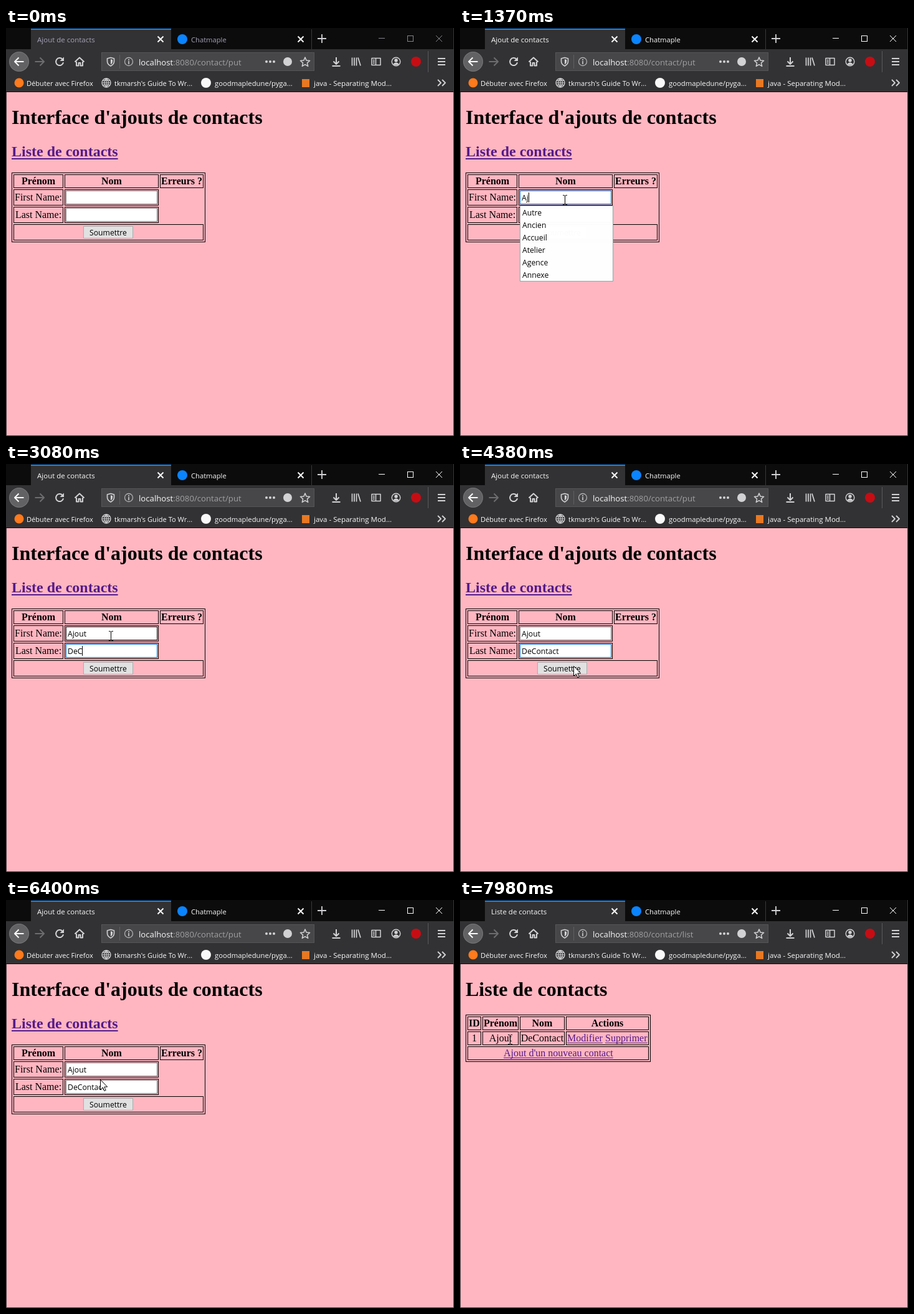
Animation, 719 px wide and 655 px high, one loop 8 s. Source, as an HTML page with a canvas:

```html
<!DOCTYPE html>
<html lang="fr">
<head>
<meta charset="utf-8">
<title>Ajout de contacts</title>
<style>
html, body { margin: 0; width: 100%; height: 100%; overflow: hidden; background: #ffb6c1; }
canvas { display: block; }
</style>
</head>
<body>
<canvas id="stage" width="719" height="655"></canvas>
<script>
const g = document.getElementById('stage').getContext('2d');
const LOOP = 8000;
const UI = '"Open Sans", "Noto Sans", sans-serif';
const SERIF = '"Liberation Serif", "Times New Roman", serif';
const FIELD = '12.2px ' + UI;
const BODY = '16px ' + SERIF;
const BOLD = 'bold 16px ' + SERIF;
const PINK = '#ffb6c1', BAR = '#323234', DARK = '#0c0c0d', LIGHT = '#f9f9fa', ICON = '#d2d2d4';
const VISITED = '#551a8b', BLUE = '#0a84ff';

// Times of the main events, in ms
const ACTIVATE = 520, FOCUS_FIRST = 600, FOCUS_LAST = 2030, SUBMIT = 5580, RELOADED = 5735;
const STATUS = 6930, FOLLOW = 7110, LIST = 7300, LISTED = 7330;

const first = { word: 'Ajout', keys: [990, 1370, 1570, 1640, 1780], y: 261 };
const last = { word: 'DeContact', keys: [2390, 2720, 2980, 3100, 3240, 3380, 3560, 3770, 3950], y: 289 };

const path = [
  [70, 600, 690], [100, 545, 640], [150, 460, 567], [200, 360, 475], [250, 285, 408],
  [320, 215, 335], [420, 172, 285], [480, 168, 276], [4150, 168, 276], [4250, 172, 292],
  [4330, 180, 312], [4380, 182, 324], [4460, 178, 348], [4610, 178, 348], [4660, 176, 340],
  [4760, 175, 330], [5020, 175, 330], [5170, 173, 332], [6200, 173, 332], [6370, 158, 300],
  [6450, 140, 270], [6560, 118, 228], [6730, 109, 200], [7850, 109, 200], [7960, 80, 224]
];

const clamp = v => Math.max(0, Math.min(1, v));

function fill(x, y, w, h, color) {
  g.fillStyle = color;
  g.fillRect(x, y, w, h);
}

function frame(x, y, w, h, color) {
  g.strokeStyle = color;
  g.lineWidth = 1;
  g.strokeRect(x + .5, y + .5, w - 1, h - 1);
}

function disc(x, y, r, color) {
  g.fillStyle = color;
  g.beginPath();
  g.arc(x, y, r, 0, 7);
  g.fill();
}

function ring(x, y, r, color, width) {
  g.strokeStyle = color;
  g.lineWidth = width;
  g.beginPath();
  g.arc(x, y, r, 0, 7);
  g.stroke();
}

function text(str, x, y, font, color, align = 'left') {
  g.font = font;
  g.fillStyle = color;
  g.textAlign = align;
  g.fillText(str, x, y);
  return g.measureText(str).width;
}

function ui(str, x, y, size, color) {
  return text(str, x, y, size + 'px ' + UI, color);
}

function icon(d, x, y, color = ICON, width = 2, solid) {
  const p = new Path2D(d);
  g.save();
  g.translate(x, y);
  if (solid) {
    g.fillStyle = solid;
    g.fill(p);
  }
  if (width) {
    g.strokeStyle = color;
    g.lineWidth = width;
    g.lineJoin = 'round';
    g.stroke(p);
  }
  g.restore();
}

function star(x, y, r) {
  let d = '';
  for (let i = 0; i < 10; i++) {
    const a = i * Math.PI / 5, k = i % 2 ? r * .45 : r;
    d += (i ? 'L' : 'M') + Math.sin(a) * k + ' ' + -Math.cos(a) * k;
  }
  icon(d + 'Z', x, y, ICON, 1.5);
}

// Blue wave over the tab once a page has loaded
function burst(t, start) {
  const p = (t - start) / 375;
  if (p < 0 || p >= 1) return;
  const e = 1 - (1 - p) ** 1.7;
  g.save();
  g.beginPath();
  g.rect(40, 3, 225, 31);
  g.clip();
  g.globalAlpha = .45 * (1 - e);
  disc(59, 18, 5 + 95 * e, BLUE);
  g.restore();
}

function tabs(t) {
  const active = t >= ACTIVATE;
  const label = active ? LIGHT : '#a5a1b6';
  const control = active ? '#fff' : '#85858a';
  const cross = 'M-4.5 -4.5L4.5 4.5M4.5 -4.5L-4.5 4.5';
  fill(0, 0, 719, 34, DARK);
  fill(40, 1, 225, 33, BAR);
  fill(40, 1, 225, 2, BLUE);
  fill(490, 2, 1, 32, '#39393b');
  burst(t, RELOADED);
  burst(t, LISTED);
  ui(t < LIST ? 'Ajout de contacts' : 'Liste de contacts', 50, 23, 11.5, label);
  disc(283, 18, 8, BLUE);
  ui('Chatmaple', 297, 23, 11.2, label);
  icon(cross, 248, 18, LIGHT, 2);
  icon(cross, 473, 18, LIGHT, 2);
  icon('M-7 0H7M0 -7V7', 507, 17, ICON, 1.8);
  fill(598, 16, 10, 1, control);
  frame(644, 12, 10, 10, control);
  icon('M-5 -5L5 5M5 -5L-5 5', 695, 17, control, 1);
}

function toolbar(t) {
  fill(0, 34, 719, 69, BAR);
  disc(21, 54, 16, '#626264');
  ring(21, 54, 15.5, '#757577', 1);
  icon('M7.5 0H-7M-.5 -6.5L-7 0L-.5 6.5', 21, 54, LIGHT);
  icon('M-7.5 0H7M.5 -6.5L7 0L.5 6.5', 54, 54, '#6d6d6f');
  icon('M4.6 -3.9A6 6 0 1 0 6 1.2', 86, 54);
  icon('M7 -7.5V-1H.5Z', 86, 54, ICON, 0, ICON);
  icon('M-7.5 .5L0 -6.5L7.5 .5M-5 0V6.5H-1.5V2H1.5V6.5H5V0', 118, 54);

  fill(153, 39, 342, 30, '#474749');
  frame(153, 39, 342, 30, '#555557');
  icon('M0 -6.5L5.5 -5V-.5C5.5 3 3 5.5 0 7C-3 5.5 -5.5 3 -5.5 -.5V-5Z', 168, 54, ICON, 1.6);
  icon('M0 -4L3 -3V0C3 2 1.5 3.5 0 4.5Z', 168, 54, ICON, 0, ICON);
  fill(182, 43, 1, 22, '#606062');
  ring(197, 54, 6.5, '#b1b1b3', 1.3);
  fill(196, 53, 2, 5, '#b1b1b3');
  fill(196, 50, 2, 2, '#b1b1b3');
  const w = ui('localhost', 213, 60, 13.2, LIGHT);
  ui(':8080/contact/' + (t < LIST ? 'put' : 'list'), 213 + w, 60, 13.2, '#a0a0a2');
  for (let i = -1; i < 2; i++) disc(424 + i * 6, 54, 2, ICON);
  disc(452, 54, 7, ICON);
  star(480, 55, 8);

  icon('M0 -7V4M-4.5 -.5L0 4L4.5 -.5M-6.5 7H6.5', 530, 54);
  icon('M-6.5 -6.5V6.5M-3 -6.5V6.5M.5 -6.5V6.5M3 -6.5L7 6.5', 562, 54, ICON, 1.7);
  icon('M-7 -5.5H7V5.5H-7ZM-.5 -5.5V5.5M-5 -2.5H-2.5M-5 0H-2.5M-5 2.5H-2.5', 594, 54, ICON, 1.5);
  ring(626, 54, 6.8, ICON, 1.4);
  disc(626, 52, 2.7, ICON);
  icon('M-4.5 4C-3 .5 3 .5 4.5 4C2.5 6 -2.5 6 -4.5 4Z', 626, 54, ICON, 0, ICON);
  disc(658, 54, 8, '#c70d14');
  fill(677, 37, 1, 34, '#5a5a5c');
  icon('M-6 -5H6M0 0M-6 0H6M-6 5H6', 699, 54);

  disc(21, 88, 7.5, '#ff7a1c');
  ui('Débuter avec Firefox', 33, 93, 11.1, LIGHT);
  ring(161, 88, 7, ICON, 1.3);
  icon('M-7 0H7M0 -7V7M-6 -3.5H6M-6 3.5H6M0 -7C-4.5 -3 -4.5 3 0 7C4.5 3 4.5 -3 0 -7', 161, 88, ICON, 1.1);
  ui("tkmarsh's Guide To Wr...", 174, 93, 11.1, LIGHT);
  disc(321, 88, 8, LIGHT);
  ui('goodmapledune/pyga...', 335, 93, 11.3, LIGHT);
  fill(475, 82, 12, 13, '#e87922');
  ui('java - Separating Mod...', 494, 93, 11.5, LIGHT);
  icon('M-6 -5L-1 0L-6 5M1 -5L6 0L1 5', 699, 88, ICON, 1.8);
  fill(0, 102, 719, 1, DARK);
}

function input(t, field, focused, hovered) {
  const y = field.y;
  fill(96, y, 147, 22, '#fff');
  frame(96, y, 147, 22, focused ? '#0078d7' : hovered ? '#171717' : '#7a7a7a');
  const n = field.keys.filter(k => k <= t).length;
  const w = text(field.word.slice(0, n), 99, y + 16, FIELD, '#000');
  if (!focused) return;
  const start = n ? field.keys[n - 1] : field === first ? FOCUS_FIRST : FOCUS_LAST;
  if ((t - start) % 800 < 400) fill(Math.round(99 + w), y + 3, 1, 16, '#000');
}

function popup(t, y, rows, from, to) {
  const a = Math.min(clamp((t - from + 50) / 150), clamp(1 - (t - to) / 60));
  if (t < from || a <= 0) return;
  g.globalAlpha = a;
  const h = rows.length * 20 + 2;
  fill(96, y, 150, h, '#fff');
  frame(96, y, 150, h, '#a0a0a0');
  rows.forEach((r, i) => text(r, 100, y + 16 + i * 20, FIELD, '#000'));
  g.globalAlpha = 1;
}

function button(t) {
  const down = t >= SUBMIT && t < SUBMIT + 100;
  const over = t >= 4640 && t < 6230;
  fill(124, 318, 80, 20, down ? '#cce4f7' : over ? '#e5f1fb' : '#e1e1e1');
  frame(124, 318, 80, 20, down ? '#005499' : over ? '#0078d7' : '#adadad');
  text('Soumettre', 164, 333, FIELD, '#000', 'center');
}

function cell(x, y, right, h, label, font) {
  frame(x, y, right - x, h, '#000');
  if (label) text(label, (x + right) / 2, y + (h > 22 ? 18 : 16), font || BODY, '#000', 'center');
}

function formPage(t, c) {
  text("Interface d'ajouts de contacts", 9, 154, 'bold 32px ' + SERIF, '#000');
  const pressed = t >= FOLLOW;
  const color = pressed ? '#ee0000' : VISITED;
  const w = text('Liste de contacts', 9, 206, 'bold 24px ' + SERIF, color);
  fill(9, 209, w, 2, color);
  if (pressed) {
    g.setLineDash([1, 1]);
    frame(8, 184, 173, 28, color);
    g.setLineDash([]);
  }
  frame(9, 232, 311, 112, '#000');
  cell(12, 235, 92, 22, 'Prénom', BOLD);
  cell(94, 235, 245, 22, 'Nom', BOLD);
  cell(247, 235, 317, 22, 'Erreurs ?', BOLD);
  cell(12, 259, 92, 26, 'First Name:');
  cell(94, 259, 245, 26);
  cell(12, 287, 92, 26, 'Last Name:');
  cell(94, 287, 245, 26);
  cell(12, 315, 317, 26);
  input(t, first, t >= FOCUS_FIRST && t < FOCUS_LAST, c && over(c, first));
  input(t, last, t >= FOCUS_LAST && t < SUBMIT, c && over(c, last));
  button(t);
  popup(t, 285, ['Autre', 'Ancien', 'Accueil', 'Atelier', 'Agence', 'Annexe'], 990, 1370);
  const rows = ['Dernier', 'Divers', 'Dossier'];
  popup(t, 313, t < 2720 ? rows : rows.slice(0, 1), 2440, 2980);
}

function link(str, x, y) {
  const w = text(str, x, y, BODY, VISITED);
  fill(x, y + 2, w, 1, VISITED);
}

function listPage() {
  text('Liste de contacts', 9, 154, 'bold 32px ' + SERIF, '#000');
  frame(9, 184, 297, 76, '#000');
  const edges = [[12, 34], [36, 94], [96, 168], [170, 303]];
  const heads = ['ID', 'Prénom', 'Nom', 'Actions'];
  const values = ['1', 'Ajout', 'DeContact', ''];
  edges.forEach(([l, r], i) => {
    cell(l, 187, r, 22, heads[i], BOLD);
    cell(l, 211, r, 22, values[i]);
  });
  link('Modifier', 172, 227);
  link('Supprimer', 233, 227);
  cell(12, 235, 303, 22);
  link("Ajout d'un nouveau contact", 70, 251);
}

function cursorAt(t) {
  if (t < path[0][0]) return null;
  const i = path.findIndex(p => p[0] > t);
  if (i < 0) return path[path.length - 1].slice(1);
  const a = path[i - 1], b = path[i], k = (t - a[0]) / (b[0] - a[0]);
  return [a[1] + (b[1] - a[1]) * k, a[2] + (b[2] - a[2]) * k];
}

function over([x, y], field) {
  return x >= 96 && x < 243 && y >= field.y && y < field.y + 22;
}

function pointer(t, c) {
  const x = Math.round(c[0]), y = Math.round(c[1]);
  const onForm = t < LIST;
  if (onForm && x < 181 && y >= 184 && y < 212) {
    icon('M-1.5 1C-1.5 -1 1.5 -1 1.5 1V8C2 6.5 4.5 6.8 4.8 8.5C5.5 7.4 7.5 7.8 7.8 9.5C8.8 8.6 10.5 9.2 10.5 11V15C10.5 18 8.5 19 8.5 22H-.5C-.5 19 -3 17 -5 13.5C-6.5 11 -4 10 -2.8 12L-1.5 13.5ZM1.5 8V11M4.8 8.5V11.5M7.8 9.5V12', x, y, '#000', 1, '#fff');
  } else if (onForm ? over(c, first) || over(c, last) : y > 213) {
    icon('M-3 -7.5H-1L.5 -6.5L2 -7.5H4M.5 -6.5V6.5M-3 7.5H-1L.5 6.5L2 7.5H4', x, y, '#000', 1);
  } else {
    icon('M.5 .5V16.5L4.3 12.9L6.8 18.5L9.2 17.5L6.8 12H11.7Z', x, y, '#000', 1, '#fff');
  }
}

function clickSpot(t, c) {
  const hit = [ACTIVATE, SUBMIT, FOLLOW].some(s => t >= s && t < s + 110);
  if (!hit) return;
  g.globalAlpha = .72;
  disc(c[0] - .5, c[1], 11.5, '#ffcc22');
  g.globalAlpha = 1;
}

function draw(t) {
  const c = cursorAt(t);
  fill(0, 0, 719, 655, PINK);
  tabs(t);
  toolbar(t);
  if (t < LIST) formPage(t, c);
  else listPage();
  fill(0, 103, 1, 552, '#3a3538');
  fill(718, 0, 1, 655, '#3a3538');
  fill(0, 654, 719, 1, '#3a3538');
  if (t >= STATUS && t < LIST) {
    fill(1, 634, 149, 20, BAR);
    frame(0, 634, 150, 21, '#4a4a4c');
    ui('localhost:8080/contact/list', 5, 650, 11.4, LIGHT);
  }
  if (c) {
    clickSpot(t, c);
    pointer(t, c);
  }
}

const begin = performance.now();
function tick() {
  draw((performance.now() - begin) % LOOP);
  requestAnimationFrame(tick);
}
tick();
</script>
</body>
</html>
```
